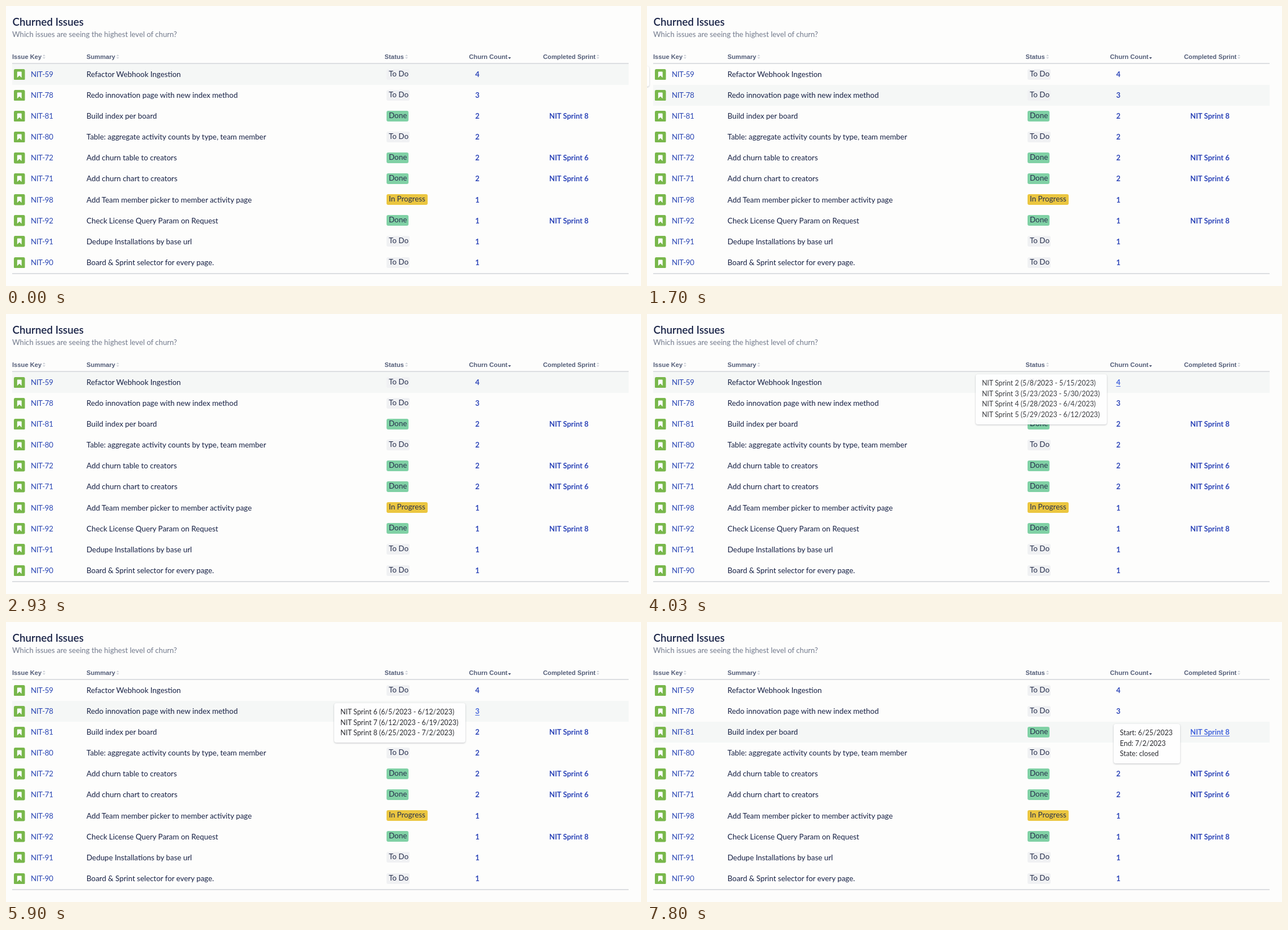
An HTML page for the animation above (8 s loop, 1128 by 497 pixels).

```html
<!DOCTYPE html>
<html lang="en">
<head>
<meta charset="utf-8">
<title>Churned Issues</title>
<style>
  html, body { margin: 0; width: 100%; height: 100%; overflow: hidden; background: #fdfdfc; }
  body { position: relative; font: 13.4px/20px Lato, "Open Sans", sans-serif; color: #172145; }
  body * { position: absolute; white-space: nowrap; }

  h1 { margin: 0; left: 11.5px; top: 16px; font-size: 18.8px; line-height: 24px; font-weight: 600; }
  .sub { left: 11px; top: 40px; font-size: 13.2px; color: #727a8c; }
  .head { top: 80px; font: bold 11.2px/20px "Liberation Sans", Arial, sans-serif; color: #535d78; }
  .rule { left: 11px; width: 1095px; height: 2px; background: #dcdee1; }

  .sort { top: 86px; width: 5px; height: 8px; overflow: visible; fill: #cfd3da; }
  .sort.down { fill: #414b68; }
  .sort.down .up { display: none; }

  #table { left: 0; top: 0; }
  .row { left: 11px; width: 1095px; height: 37.1px; }
  .row > span { top: 8.4px; }
  .hover { inset: 0; background: #f5f7f6; opacity: 0; }
  .icon { left: 3.2px; top: 9px; width: 19.6px; height: 19.6px; }
  .key { left: 33px; letter-spacing: -.3px; color: #2a46b4; }
  .summary { left: 132px; }
  .link { font-weight: 700; font-size: 13px; color: #2d45b8;
          text-decoration: underline transparent; text-underline-offset: 2px; }
  .count { left: 822.5px; }
  .sprint { left: 954px; }
  .row > .badge { left: 665px; top: 9px; height: 19px; line-height: 17px; border-radius: 3px;
           text-indent: 4px; color: #27304d; }
  .todo { width: 41px; background: #f0f1f3; }
  .done { width: 39px; background: #80d1a5; }
  .progress { width: 73px; background: #ebc640; }

  .tip { box-sizing: border-box; padding: 7.2px 11.5px; border-radius: 4px; background: #fefefe;
         box-shadow: 0 1px 3px rgba(20, 25, 40, .26); font-size: 12.4px; line-height: 18.6px;
         color: #2b2c31; white-space: pre; opacity: 0; }

  .hover, .link { animation: 8s step-end infinite; }
  .tip { animation: 8s ease infinite; }

  .r0 .hover { animation-name: row-a; }
  .r1 .hover { animation-name: row-b; }
  .r2 .hover { animation-name: row-c; }
  @keyframes row-a { 0%, 32.875% { opacity: 1 } 21.25%, 70%, 100% { opacity: 0 } }
  @keyframes row-b { 0%, 32.875%, 77.5%, 100% { opacity: 0 } 21.25%, 70% { opacity: 1 } }
  @keyframes row-c { 0% { opacity: 0 } 77.5%, 100% { opacity: 1 } }

  .r0 .count { animation-name: link-a; }
  .r1 .count { animation-name: link-b; }
  .r2 .sprint { animation-name: link-c; }
  @keyframes link-a {
    0%, 65.875%, 100% { color: #2d45b8; text-decoration-color: transparent }
    41.625% { color: #4364dc; text-decoration-color: #4364dc }
  }
  @keyframes link-b {
    0%, 77.5%, 100% { color: #2d45b8; text-decoration-color: transparent }
    70% { color: #4364dc; text-decoration-color: #4364dc }
  }
  @keyframes link-c {
    0% { color: #2d45b8; text-decoration-color: transparent }
    90.375%, 100% { color: #4364dc; text-decoration-color: #4364dc }
  }

  #tip-icon { left: -60px; top: 107px; width: 64px; height: 36px; animation-name: tip-icon; }
  #tip-a { left: 582.5px; top: 107px; width: 233px; height: 89px; animation-name: tip-a; }
  #tip-b { left: 582.5px; top: 144px; width: 233px; height: 70px; animation-name: tip-b; }
  #tip-c { left: 828.5px; top: 181px; width: 118px; height: 70px; animation-name: tip-c; }
  @keyframes tip-icon {
    0%, 5.375%, 25%, 100% { opacity: 0; transform: translateX(10px) }
    10.375%, 21.25% { opacity: 1; transform: none }
  }
  @keyframes tip-a {
    0%, 46.625%, 72.5%, 100% { opacity: 0; transform: translateX(10px) }
    52.5%, 70% { opacity: 1; transform: none }
  }
  @keyframes tip-b {
    0%, 70%, 80.5%, 100% { opacity: 0; transform: translateX(10px) }
    73.75%, 77.5% { opacity: 1; transform: none }
  }
  @keyframes tip-c {
    0%, 95% { opacity: 0; transform: translateX(10px) }
    97.5%, 100% { opacity: 1; transform: none }
  }
</style>
</head>
<body>
<h1>Churned Issues</h1>
<div class="sub">Which issues are seeing the highest level of churn?</div>
<div id="table"></div>
<div class="rule" style="top:101px"></div>
<div class="rule" style="top:474px"></div>
<div class="tip" id="tip-icon"></div>
<div class="tip" id="tip-a">NIT Sprint 2 (5/8/2023 - 5/15/2023)
NIT Sprint 3 (5/23/2023 - 5/30/2023)
NIT Sprint 4 (5/28/2023 - 6/4/2023)
NIT Sprint 5 (5/29/2023 - 6/12/2023)</div>
<div class="tip" id="tip-b">NIT Sprint 6 (6/5/2023 - 6/12/2023)
NIT Sprint 7 (6/12/2023 - 6/19/2023)
NIT Sprint 8 (6/25/2023 - 7/2/2023)</div>
<div class="tip" id="tip-c">Start: 6/25/2023
End: 7/2/2023
State: closed</div>
<script>
  // label, text x, sort arrow x
  const heads = [
    ['Issue Key', 11, 65], ['Summary', 143, 196], ['Status', 672.5, 708.5],
    ['Churn Count', 822.5, 892, 'down'], ['Completed Sprint', 954, 1048.5]
  ];
  const labels = { todo: 'To Do', done: 'Done', progress: 'In Progress' };
  // key, summary, status, churn count, completed sprint
  const issues = [
    [59, 'Refactor Webhook Ingestion', 'todo', 4],
    [78, 'Redo innovation page with new index method', 'todo', 3],
    [81, 'Build index per board', 'done', 2, 8],
    [80, 'Table: aggregate activity counts by type, team member', 'todo', 2],
    [72, 'Add churn table to creators', 'done', 2, 6],
    [71, 'Add churn chart to creators', 'done', 2, 6],
    [98, 'Add Team member picker to member activity page', 'progress', 1],
    [92, 'Check License Query Param on Request', 'done', 1, 8],
    [91, 'Dedupe Installations by base url', 'todo', 1],
    [90, 'Board &amp; Sprint selector for every page.', 'todo', 1]
  ];

  const headCell = ([label, x, arrowX, sort = '']) => `
    <div class="head" style="left:${x}px">${label}</div>
    <svg class="sort ${sort}" style="left:${arrowX}px" viewBox="0 0 5 8">
      <path class="up" d="M0 3L2.5 0L5 3z"/><path d="M0 5H5L2.5 8z"/>
    </svg>`;

  const icon = `<svg class="icon" viewBox="0 0 20 20">
    <rect width="20" height="20" rx="2.5" fill="#78b74b"/>
    <path d="M6 5.5Q6 4.5 7 4.5H13Q14 4.5 14 5.5V15.5L10 11.8L6 15.5z" fill="#fff"/>
  </svg>`;

  const issueRow = ([key, summary, status, count, sprint], i) => `
    <div class="row r${i}" style="top:${102.6 + 37.1 * i}px">
      <div class="hover"></div>${icon}
      <span class="key">NIT-${key}</span>
      <span class="summary">${summary}</span>
      <span class="badge ${status}">${labels[status]}</span>
      <span class="link count">${count}</span>
      ${sprint ? `<span class="link sprint">NIT Sprint ${sprint}</span>` : ''}
    </div>`;

  document.getElementById('table').innerHTML =
    heads.map(headCell).join('') + issues.map(issueRow).join('');
</script>
</body>
</html>
```
